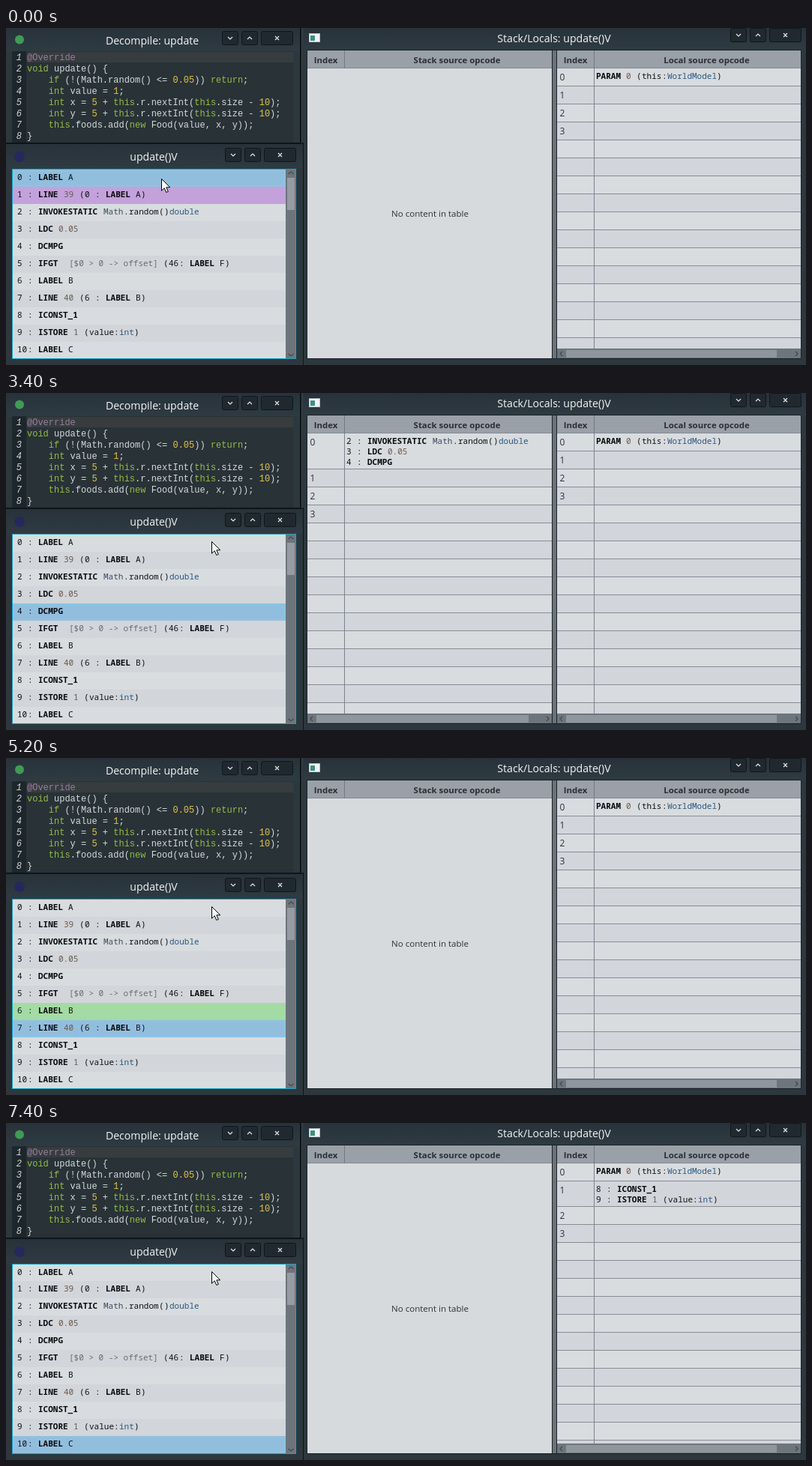
Animation of 1067x450 px, one loop 8000 ms. Source, as an HTML page:

```html
<!DOCTYPE html>
<html lang="en">
<head>
<meta charset="utf-8">
<title>Stack and locals viewer</title>
<style>
html, body { margin: 0; width: 100%; height: 100%; overflow: hidden; background: #2c373d; }
svg { display: block; }
text { white-space: pre; }
.title { font: 14.1px "Open Sans", sans-serif; fill: #f4f6f7; text-anchor: middle; }
.head { font: 700 11.4px "Open Sans", sans-serif; fill: #2a2e35; text-anchor: middle; }
.note { font: 11.55px "Open Sans", sans-serif; fill: #2e3135; text-anchor: middle; }
.idx { font: 12px "Open Sans", sans-serif; fill: #2f3040; }
.code { font: 12px "Liberation Mono", monospace; fill: #d6dadb; }
.num { font: italic 12px "Liberation Mono", monospace; fill: #d3d7d9; text-anchor: end; }
.op { font: 11px "Noto Sans Mono", monospace; fill: #101114; }
.b { font-weight: 700; fill: #08090b; }
.n { fill: #6c594d; }
.g { fill: #6b6d71; }
.t { fill: #2b5780; }
.m { fill: #3d4c60; }
.k { fill: #93bd45; }
.y { fill: #e0c549; }
.a { fill: #9a7ba0; }
.icon { fill: none; stroke: #e9edef; stroke-width: 1.1; }
.arrow { fill: none; stroke: #42494f; stroke-width: 1.3; }
</style>
</head>
<body>
<svg id="stage" width="1067" height="450" viewBox="0 0 1067 450">
  <defs>
    <linearGradient id="bar" x2="0" y2="1">
      <stop offset="0" stop-color="#27323a"/><stop offset="1" stop-color="#2f3b42"/>
    </linearGradient>
    <clipPath id="listClip"><rect x="9" y="189" width="364" height="252"/></clipPath>
    <clipPath id="tableClip"><rect x="402" y="54" width="658" height="387"/></clipPath>
  </defs>
  <g id="frame"></g>
  <g id="tables" clip-path="url(#tableClip)"></g>
  <g id="list" clip-path="url(#listClip)"></g>
  <path id="cursor" d="M.5 .5V16.2L4.2 12.7L6.8 18.5L9.3 17.4L6.8 11.8H11.7Z" fill="#fff" stroke="#000"/>
</svg>
<script>
const LOOP = 8000;
const CHAR = 6.598;
const $ = id => document.getElementById(id);

const safe = s => s.replace(/&/g, '&amp;').replace(/</g, '&lt;').replace(/>/g, '&gt;');
// {c:text} puts text in a span of class c
const mark = s => safe(s).replace(/\{(\w):([^}]*)\}/g, '<tspan class="$1">$2</tspan>');
const text = (cls, x, y, s) => `<text class="${cls}" x="${x}" y="${y}">${mark(s)}</text>`;
const rect = (x, y, w, h, fill, more = '') =>
  `<rect x="${x}" y="${y}" width="${w}" height="${h}" fill="${fill}" ${more}/>`;
const path = (cls, d) => `<path class="${cls}" d="${d}"/>`;

const code = [
  '{a:@Override}',
  '{k:void} update() {',
  '    {k:if} (!(Math.random() <= {y:0.05})) {k:return};',
  '    {k:int} value = {y:1};',
  '    {k:int} x = {y:5} + {k:this}.r.nextInt({k:this}.size - {y:10});',
  '    {k:int} y = {y:5} + {k:this}.r.nextInt({k:this}.size - {y:10});',
  '    {k:this}.foods.add({k:new} Food(value, x, y));',
  '}'
];

const ops = [
  '{b:LABEL} A',
  '{b:LINE} {n:39} (0 : {b:LABEL} A)',
  '{b:INVOKESTATIC} {m:Math}.random(){t:double}',
  '{b:LDC} {n:0.05}',
  '{b:DCMPG}',
  '{b:IFGT}  {g:[$0 > 0 -> offset]} (46: {b:LABEL} F)',
  '{b:LABEL} B',
  '{b:LINE} {n:40} (6 : {b:LABEL} B)',
  '{b:ICONST_1}',
  '{b:ISTORE} {n:1} (value:{t:int})',
  '{b:LABEL} C'
].map((op, i) => String(i).padEnd(2) + ': ' + op);
const param = '{b:PARAM} {n:0} (this:{t:WorldModel})';

// from: start in ms, sel: selected row, stack and locals: lines per slot
const lines = (...slots) => slots.map(slot => slot.map(i => ops[i]));
const steps = [
  { from: 0, sel: 0, purple: 1 },
  { from: 1800, sel: 1, green: 0 },
  { from: 2200, sel: 2, stack: lines([2]) },
  { from: 2800, sel: 3, stack: lines([2], [3]) },
  { from: 3400, sel: 4, stack: lines([2, 3, 4]) },
  { from: 3800, sel: 5 },
  { from: 4400, sel: 6, purple: 7 },
  { from: 5200, sel: 7, green: 6 },
  { from: 5800, sel: 8, stack: lines([8]) },
  { from: 6600, sel: 9, locals: lines([8, 9]) },
  { from: 7400, sel: 10, locals: lines([8, 9]), scroll: 1 }
];
const moves = [
  { from: 0, x: 207, y: 201 },
  { from: 200, x: 278, y: 194 },
  { from: 400, x: 278, y: 193 },
  { from: 800, x: 274, y: 198 }
];
const at = (track, t) => track.filter(s => s.from <= t).pop();

// Each word, sign or marked span starts on a whole pixel
function opLine(s, x, y) {
  const runs = s.match(/\{\w:[^}]*\}|\w+|./g).map(run => {
    const [, cls, body] = run.match(/^\{(\w):(.*)\}$/) || [0, '', run];
    const span = `<tspan class="${cls}" x="${x}">${safe(body)}</tspan>`;
    x += Math.ceil(body.length * CHAR);
    return span;
  });
  return `<text class="op" y="${y}">${runs.join('')}</text>`;
}

function buttons(x, y) {
  const box = (dx, w) => rect(x + dx + .5, y + .5, w, 18, '#20292f', 'rx="2" stroke="#10161a"');
  const cy = y + 9.5;
  return box(0, 21) + box(26, 21) + box(52, 42) +
    path('icon', `M${x + 8} ${cy - 1.5}l3 3l3 -3 M${x + 34} ${cy + 1.5}l3 -3l3 3` +
      `M${x + 71} ${cy - 2.5}l5 5m0 -5l-5 5`);
}

function scrollBar(x, w, thumb) {
  return rect(x, 428, w, 13, '#6e767d') + rect(x + 12, 430, thumb, 10, '#8f969e') +
    path('arrow', `M${x + 7} 432l-3 3l3 3 M${x + w - 7} 432l3 3l-3 3`);
}

function header(x, w, title) {
  return rect(x, 30, w, 24, '#9aa0a8') + rect(x, 53, w, 1, '#858b94') +
    rect(x + 49, 30, 1, 24, '#747a84') +
    text('head', x + 24.5, 47, 'Index') + text('head', x + 199.5, 47, title);
}

function drawFrame() {
  let s = rect(0, 0, 1067, 450, '#2d383e');
  // Decompiler window
  s += rect(0, 0, 392, 31, 'url(#bar)') + rect(8, 31, 375, 123, '#283237') +
    rect(8, 31, 19, 123, '#1d262b') + rect(28, 32, 355, 14, '#373d3f') +
    '<circle cx="18" cy="15.5" r="6" fill="#3f9b55"/>' +
    text('title', 195, 22, 'Decompile: update') + buttons(288, 4);
  code.forEach((line, i) => {
    s += text('num', 21, 43 + 15 * i, String(i + 1)) + text('code', 28, 43 + 15 * i, line);
  });
  // Instruction list window
  s += rect(0, 153, 397, 2, '#0e1417') + rect(0, 155, 396, 295, '#2d383e') +
    rect(0, 155, 396, 33, 'url(#bar)') + rect(392, 0, 2, 154, '#0e1417') +
    rect(396, 154, 1, 296, '#0e1417') +
    '<circle cx="18" cy="172" r="7" fill="#25285c"/>' +
    text('title', 197, 177, 'update()V') + buttons(292, 160) +
    rect(8, 188, 379, 254, '#1ba6c9') + rect(9, 189, 377, 252, '#d8dbde') +
    rect(373, 189, 13, 252, '#6c757c') + rect(375, 200, 10, 43, '#949ba3') +
    path('arrow', 'M376.5 195l3.5 -3l3.5 3 M376.5 435l3.5 3l3.5 -3');
  // Stack and locals window
  s += rect(397, 0, 670, 30, 'url(#bar)') + rect(394, 0, 1, 154, '#3a464d') +
    rect(404.5, 7.5, 14, 11, '#f1f4f5', 'stroke="#b9c2c8"') + rect(406, 10, 6, 7, '#3d8f86') +
    text('title', 731, 19, 'Stack/Locals: update()V') + buttons(966, 0) +
    rect(401, 29, 660, 413, '#1a2227') + header(402, 326, 'Stack source opcode') +
    rect(729, 30, 5, 411, '#6b747b') + header(735, 325, 'Local source opcode');
  $('frame').innerHTML = s;
}

function table(x, w, cells, thumb) {
  let s = '', y = 54;
  for (let i = 0; y < 428; i++) {
    const cell = cells[i] || [];
    const h = Math.max(24, 6 + 14 * cell.length);
    s += rect(x, y, w, h, i % 2 ? '#d2d5da' : '#d8dcdf') + rect(x, y + h - 1, w, 1, '#898c97');
    if (i < 4) s += text('idx', x + 3.5, y + 16, String(i));
    cell.forEach((line, j) => { s += opLine(line, x + 52, y + 14 + 14 * j); });
    y += h;
  }
  return s + rect(x + 49, 54, 1, 374, '#7e8290') + scrollBar(x, w, thumb);
}

function drawTables(step) {
  const left = step.stack
    ? table(402, 326, step.stack, 283)
    : rect(402, 54, 326, 387, '#d7dadd') + text('note', 565.5, 252, 'No content in table');
  $('tables').innerHTML = left + table(735, 325, [[param], ...(step.locals || [])], 281);
}

function drawList(step) {
  $('list').innerHTML = ops.map((op, i) => {
    const shift = step.scroll && i ? 1 : 0;
    const y = 189 + 23 * i - shift;
    const fill = i === step.sel ? '#92bede' : i === step.green ? '#a4dba4' :
      i === step.purple ? '#c3a2db' : i % 2 ? '#d2d5d9' : '#d8dcdf';
    const ring = i === step.sel ? rect(10.5, y + 1.5, 361, 20, 'none', 'stroke="#86c8e6"') : '';
    return rect(9, y, 364, 23, fill) + ring + opLine(op, 15, y + 14);
  }).join('');
}

let shown;
function draw(t) {
  const step = at(steps, t), pos = at(moves, t);
  if (step !== shown) {
    drawTables(step);
    drawList(step);
    shown = step;
  }
  $('cursor').setAttribute('transform', `translate(${pos.x} ${pos.y})`);
}

function tick() {
  draw(performance.now() % LOOP);
  requestAnimationFrame(tick);
}

drawFrame();
tick();
</script>
</body>
</html>
```
